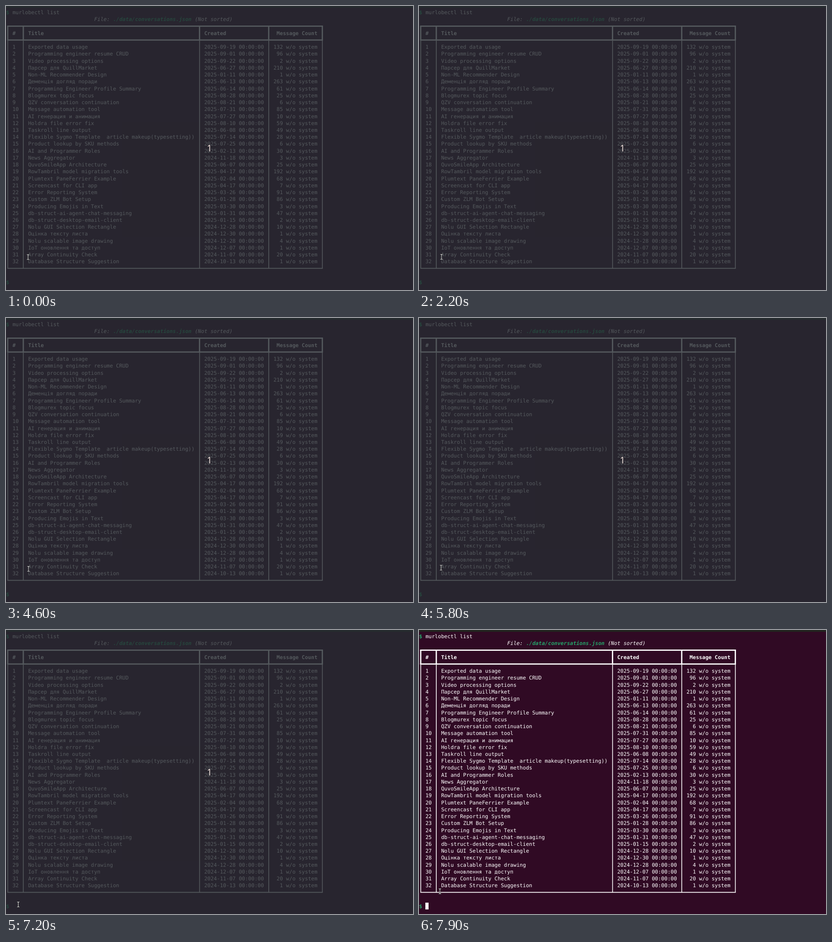
Animation, 895 px wide and 625 px high, one loop 8 s. Source, as an HTML page:

```html
<!DOCTYPE html>
<html lang="en">
<head>
<meta charset="utf-8">
<title>Terminal list</title>
<style>
  html, body { margin: 0; width: 100%; height: 100%; overflow: hidden; background: #300a24; }
  svg { display: block; width: 895px; height: 625px; }
  text {
    font: 11.486px "DejaVu Sans Mono", "Noto Sans Mono", monospace;
    fill: #fff;
    white-space: pre;
    text-rendering: geometricPrecision;
  }
  .bold { font-weight: 700; }
  .italic { font-style: italic; }
  .green { fill: #26a269; }
  .end { text-anchor: end; }
  .digit { font: 20px "Open Sans", "Noto Sans", sans-serif; fill: #f8e9e2; text-anchor: middle; }
  .heavy, .light { fill: none; stroke: #fff; }
  .heavy { stroke-width: 2.8; }
  .light { stroke-width: 1.6; }

  #caret, #veil, #mouse { animation: 8s step-end infinite; }
  #caret { animation-name: blink; }
  #veil { animation-name: veil; }
  #mouse { animation-name: move; }

  @keyframes blink {
    0%, 11.25%, 27.5%, 42.5%, 57.5%, 72.5%, 87.5% { opacity: 0; }
    5%, 18.75%, 35%, 50%, 65%, 80%, 95%, 100% { opacity: 1; }
  }
  @keyframes veil {
    0% { opacity: 1; }
    91.25%, 100% { opacity: 0; }
  }
  @keyframes move {
    0% { transform: translate(48.5px, 552.5px); }
    7.5% { transform: translate(49.5px, 552px); }
    66.25% { transform: translate(49.5px, 551px); }
    67.5% { transform: translate(49.5px, 550px); }
    68.75% { transform: translate(49px, 550px); }
    70% { transform: translate(48.5px, 549.5px); }
    81.25% { transform: translate(47px, 556px); }
    82.5% { transform: translate(41px, 574px); }
    83.75% { transform: translate(33px, 592px); }
    85% { transform: translate(28px, 602px); }
    87.5% { transform: translate(27px, 604px); }
    91.25% { transform: translate(27px, 605px); }
    92.5% { transform: translate(24.5px, 605px); }
    97.5% { transform: translate(34px, 593px); }
    98.75%, 100% { transform: translate(46px, 575px); }
  }
</style>
</head>
<body>
<svg viewBox="0 0 895 625">
  <rect width="895" height="625" fill="#300a24"/>
  <rect width="895" height="4" fill="#22241f"/>
  <g id="terminal"></g>
  <rect id="caret" x="14" y="600" width="7" height="15" fill="#fff"/>
  <g id="veil">
    <rect width="895" height="625" fill="#272d32" fill-opacity=".79"/>
    <text class="digit" x="447.5" y="320">1</text>
  </g>
  <g id="mouse" fill="none">
    <path d="M-2.5-5.5H-1L0-4.5 1-5.5H2.5M-2.5 5.5H-1L0 4.5 1 5.5H2.5M0-4.5V4.5" stroke="#111" stroke-opacity=".75" stroke-width="2.6"/>
    <path d="M-2.5-5.5H-1L0-4.5 1-5.5H2.5M-2.5 5.5H-1L0 4.5 1 5.5H2.5M0-4.5V4.5" stroke="#eee" stroke-width="1.1"/>
  </g>
</svg>
<script>
const rows = `2025-09-19|132|Exported data usage
2025-09-01|96|Programming engineer resume CRUD
2025-09-22|2|Video processing options
2025-06-27|210|Парсер для QuillMarket
2025-01-11|1|Non-ML Recommender Design
2025-06-13|263|Деменція догляд поради
2025-06-14|61|Programming Engineer Profile Summary
2025-08-28|25|Blogmurex topic focus
2025-08-21|6|QZV conversation continuation
2025-07-31|85|Message automation tool
2025-07-27|10|AI генерация и анимация
2025-08-10|59|Holdra file error fix
2025-06-08|49|Taskroll line output
2025-07-14|28|Flexible Sygmo Template  article makeup(typesetting))
2025-07-25|6|Product lookup by SKU methods
2025-02-13|30|AI and Programmer Roles
2024-11-18|3|News Aggregator
2025-06-07|25|QuvoSmileApp Architecture
2025-04-17|192|RowTambril model migration tools
2025-02-04|68|Plumtext PaneFerrier Example
2025-04-17|7|Screencast for CLI app
2025-03-26|91|Error Reporting System
2025-01-28|86|Custom ZLM Bot Setup
2025-03-30|3|Producing Emojis in Text
2025-01-31|47|db-struct-ai-agent-chat-messaging
2025-01-15|2|db-struct-desktop-email-client
2024-12-28|10|Nolu GUI Selection Rectangle
2024-12-30|1|Оцінка тексту листа
2024-12-28|4|Nolu scalable image drawing
2024-12-07|1|IoT оновлення та доступ
2024-11-07|20|Array Continuity Check
2024-10-13|1|Database Structure Suggestion`.split("\n");

const terminal = document.getElementById("terminal");
const cellX = col => col * 6.915;
const lineY = line => 13.9 + line * 15.23;

function add(tag, attrs) {
  const el = document.createElementNS("http://www.w3.org/2000/svg", tag);
  for (const key in attrs) el.setAttribute(key, attrs[key]);
  return terminal.appendChild(el);
}

function write(col, line, str, style = "") {
  add("text", { x: cellX(col) + 0.3, y: lineY(line) + 4.2, class: style }).textContent = str;
}

function rule(style, d) {
  add("path", { class: style, d });
}

// Heavy header frame over a light body frame
function drawFrame() {
  const edges = [0.55, 5.5, 61.55, 83.55, 100.6].map(cellX);
  const [headTop, headBase, base] = [2, 4, 37].map(lineY);
  const x0 = edges[0], x1 = edges[4];
  rule("light", `M${x0 - 0.8} ${base}H${x1 + 0.8}`);
  for (const y of [headTop, headBase]) rule("heavy", `M${x0 - 1.4} ${y}H${x1 + 1.4}`);
  for (const x of edges) {
    rule("heavy", `M${x} ${headTop}V${headBase}`);
    rule("light", `M${x} ${headBase}V${base}`);
  }
}

write(0, 0, "$", "green bold");
write(2, 0, "murlobectl list");
write(28, 1, "File:", "italic");
write(34, 1, "./data/conversations.json", "italic bold green");
write(60, 1, "(Not sorted)", "italic");

write(2, 3, "#", "bold");
write(7, 3, "Title", "bold");
write(63, 3, "Created", "bold");
write(99, 3, "Message Count", "bold end");

rows.forEach((row, i) => {
  const [date, count, title] = row.split("|");
  const line = i + 5;
  write(2, line, i + 1);
  write(7, line, title);
  write(63, line, date + " 00:00:00");
  write(99, line, count + " w/o system", "end");
});
write(0, 39, "$", "green bold");
drawFrame();
</script>
</body>
</html>
```
